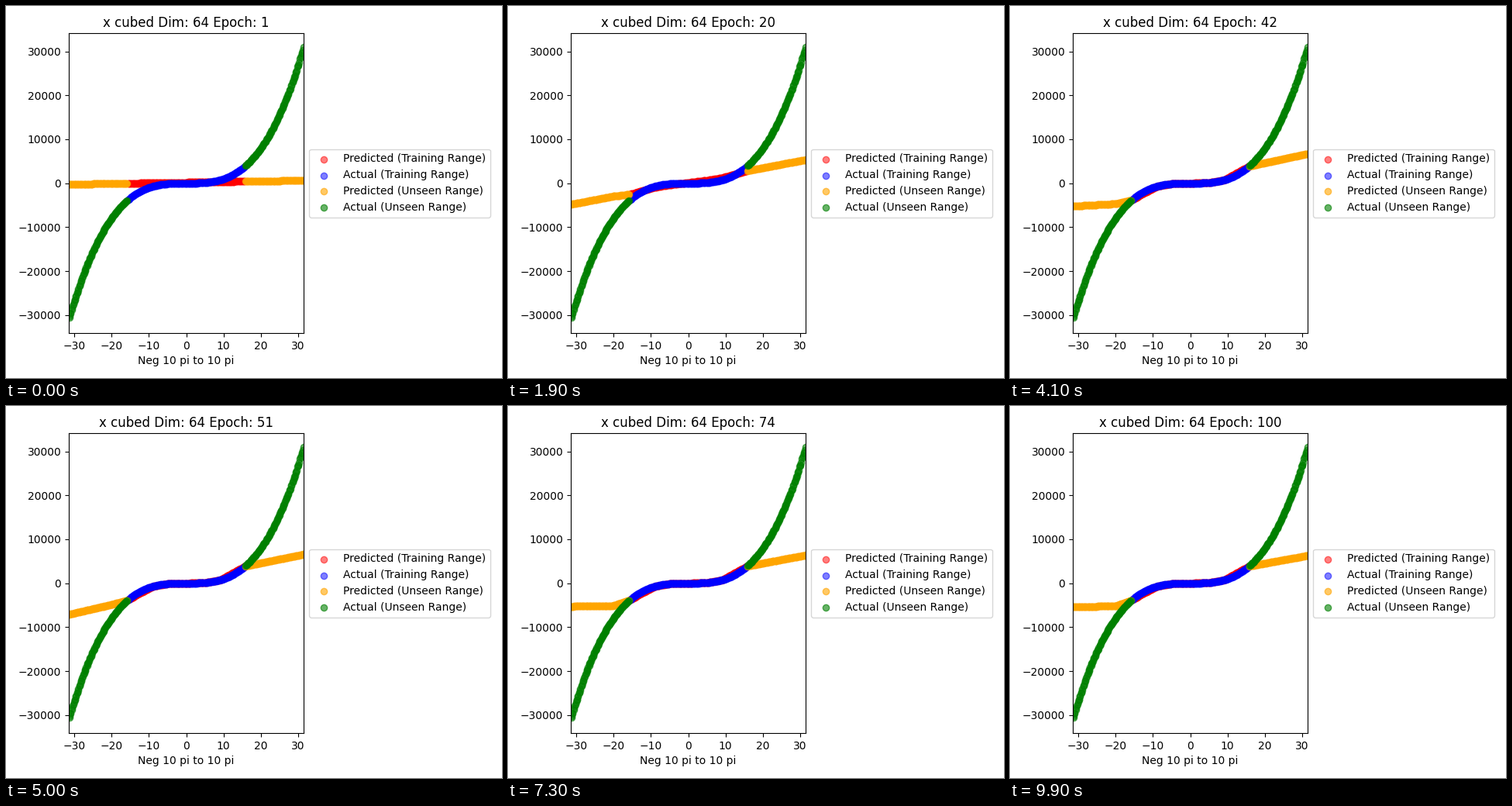
A matplotlib script that plays this animation: 640 by 480 pixels, repeating every 10000 ms.

```python
import numpy as np
import matplotlib.pyplot as plt
from matplotlib.animation import FuncAnimation

EPOCHS = 100
END = 10 * np.pi
MID = END / 2
KNEES = np.array([-MID, -9, -5, 5, 9, MID])


def early_line(x, epoch):
    """First stage: a straight line that tilts up."""
    tilt = np.clip((epoch - 1) / 11, 0, 1)
    return (14 + 124 * tilt) * x + 200


def bent_fit(x, epoch):
    """Later stage: follows the cubic inside, straight tails outside."""
    age = epoch - 20
    core = np.interp(x, KNEES, KNEES**3)
    right = (150 + 50 * np.exp(-(epoch - 28) / 30)) * np.maximum(x - MID, 0)

    shoulder = 320 * (1 - np.exp(-age / 25)) * np.clip(-MID - x, 0, 20 - MID)
    wobble = np.exp(-((epoch - 58) / 22) ** 2) * np.sin(np.pi * (epoch - 27) / 16) ** 2
    slope = 10 + 200 * np.exp(-age / 12) + 190 * wobble
    left = shoulder + slope * np.maximum(-20 - x, 0)
    return core + right - left


def predict(x, epoch):
    t = np.clip((epoch - 12) / 22, 0, 1)
    mix = t * t * (3 - 2 * t)
    return (1 - mix) * early_line(x, epoch) + mix * bent_fit(x, epoch)


def sample(rng, low, high, n):
    """Evenly spread points with a little jitter."""
    step = (high - low) / n
    x = low + step * (np.arange(n) + 0.5 + rng.uniform(-0.6, 0.6, n))
    return np.clip(x, low, high)


rng = np.random.default_rng(4)
seen = sample(rng, -MID, MID, 200)
unseen = np.concatenate([sample(rng, -END, -MID, 100), sample(rng, MID, END, 100)])

fig, ax = plt.subplots(figsize=(6.4, 4.8), dpi=100)
fig.subplots_adjust(left=81 / 640, right=384 / 640,
                    bottom=1 - 422 / 480, top=1 - 35.3 / 480)


def dots(x, y, color, alpha, label):
    return ax.scatter(x, y, color=color, alpha=alpha, label=label)


seen_fit = dots(seen, predict(seen, 1), "red", 0.5, "Predicted (Training Range)")
dots(seen, seen**3, "blue", 0.5, "Actual (Training Range)")
unseen_fit = dots(unseen, predict(unseen, 1), "orange", 0.6, "Predicted (Unseen Range)")
dots(unseen, unseen**3, "green", 0.6, "Actual (Unseen Range)")

ax.set_xlim(-END, END)
ax.set_ylim(-1.1 * END**3, 1.1 * END**3)
ax.set_xlabel("Neg 10 pi to 10 pi")
title = ax.set_title("")
ax.legend(loc="center left", bbox_to_anchor=(1, 0.5))


def update(frame):
    epoch = frame + 1
    for points, x in ((seen_fit, seen), (unseen_fit, unseen)):
        points.set_offsets(np.column_stack([x, predict(x, epoch)]))
    title.set_text(f"x cubed Dim: 64 Epoch: {epoch}")
    return seen_fit, unseen_fit, title


anim = FuncAnimation(fig, update, frames=EPOCHS, interval=100, repeat=True,
                     repeat_delay=0, blit=False)
plt.show()
```
